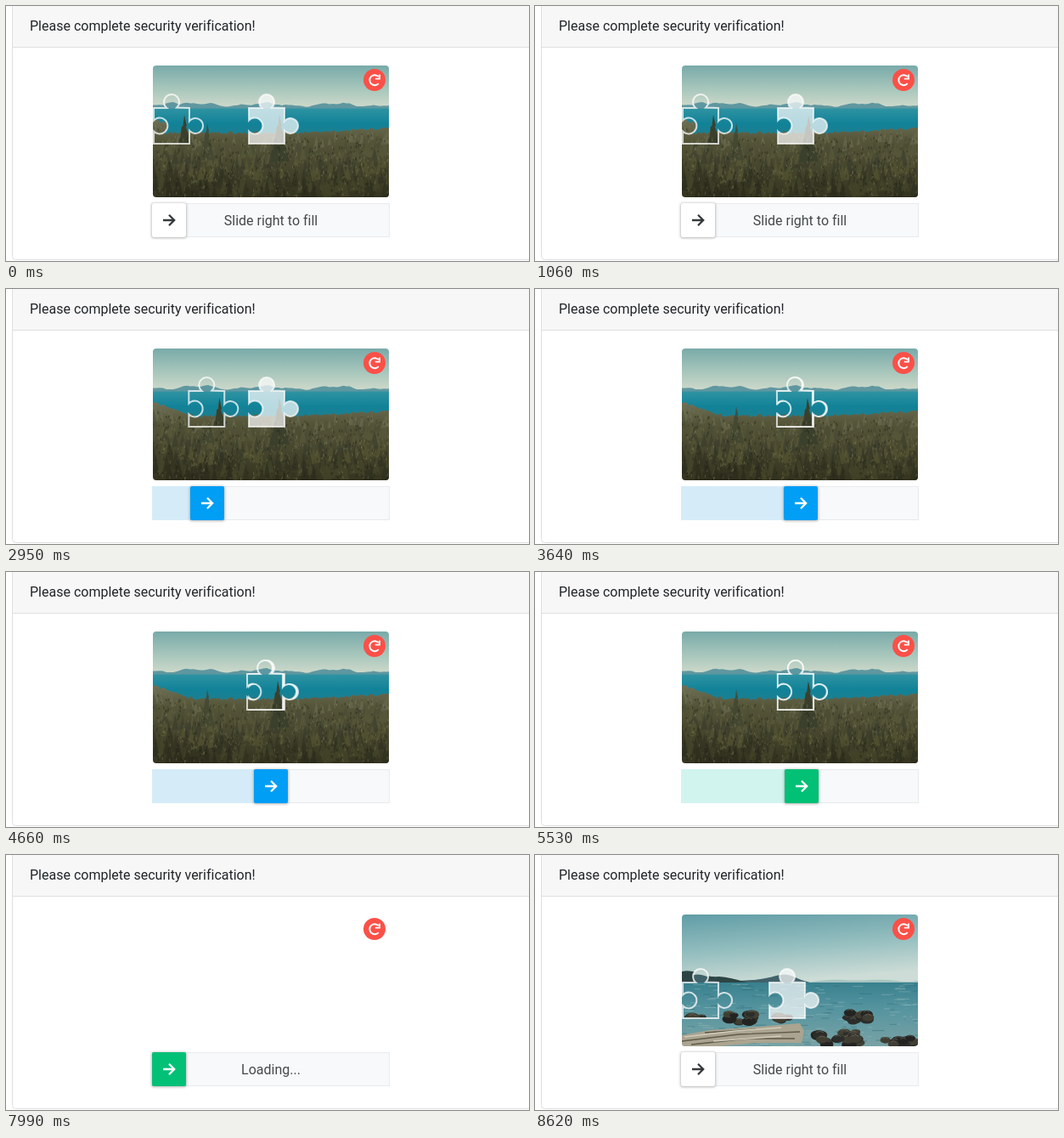
Write an HTML page that moves like this. It is 616 by 300 pixels and loops after 8.84 s.

```html
<!DOCTYPE html>
<html lang="en">
<head>
<meta charset="utf-8">
<title>Slider verification</title>
<style>
html, body { margin: 0; width: 100%; height: 100%; overflow: hidden; background: #fff; }
svg { display: block; }
.ui { font: 16px Roboto, sans-serif; font-variant-ligatures: none; }
.msg { font: 14px "Open Sans", sans-serif; fill: #fbfbfe; }
.host { font-weight: 600; }
</style>
</head>
<body>
<svg width="616" height="300" viewBox="0 0 616 300">
  <defs>
    <clipPath id="frame"><rect x="173" y="70" width="278" height="155" rx="4"/></clipPath>
    <clipPath id="cut"><path id="cutPath"/></clipPath>
    <linearGradient id="skyA" x1="0" y1="0" x2="0" y2="1">
      <stop offset="0" stop-color="#79aaa9"/><stop offset=".5" stop-color="#a3c4ba"/><stop offset="1" stop-color="#cfdacb"/>
    </linearGradient>
    <linearGradient id="lakeA" x1="0" y1="0" x2="0" y2="1">
      <stop offset="0" stop-color="#2f93a2"/><stop offset=".4" stop-color="#118298"/><stop offset="1" stop-color="#2b7a86"/>
    </linearGradient>
    <linearGradient id="woodA" x1="0" y1="0" x2="0" y2="1">
      <stop offset="0" stop-color="#6f7157"/><stop offset=".25" stop-color="#56563a"/><stop offset="1" stop-color="#34331f"/>
    </linearGradient>
    <linearGradient id="skyB" x1="0" y1="0" x2=".25" y2="1">
      <stop offset="0" stop-color="#609da6"/><stop offset=".55" stop-color="#96bfc0"/><stop offset="1" stop-color="#cddcd6"/>
    </linearGradient>
    <linearGradient id="seaB" x1="0" y1="0" x2="0" y2="1">
      <stop offset="0" stop-color="#39808e"/><stop offset=".4" stop-color="#55949f"/><stop offset="1" stop-color="#7aa3a5"/>
    </linearGradient>
    <filter id="soft" x="-20%" y="-20%" width="140%" height="150%"><feGaussianBlur stdDeviation="1.5"/></filter>
    <filter id="wide" x="-20%" y="-20%" width="140%" height="150%"><feGaussianBlur stdDeviation="6"/></filter>
  </defs>

  <rect width="616" height="300" fill="#fff"/>
  <rect x="7.5" y="-10" width="640" height="308.5" rx="4" fill="#fff" stroke="#dfdfdf"/>
  <path d="M8 0H616V48H8Z" fill="#f7f7f7"/>
  <path d="M8 48.5H616" stroke="#dfdfdf"/>
  <text class="ui" x="28" y="29" fill="#212529">Please complete security verification!</text>

  <g id="canvas">
    <g clip-path="url(#frame)">
      <g id="photo"><g id="forest"></g><g id="coast"></g></g>
    </g>
    <path id="hole" fill="#fff" fill-opacity=".7" stroke="#fff" stroke-opacity=".7" stroke-width="2"/>
    <g id="piece">
      <g clip-path="url(#cut)"><use id="copy" href="#photo"/></g>
      <path id="rim" fill="none" stroke="#fff" stroke-opacity=".75" stroke-width="2"/>
    </g>
  </g>
  <circle cx="434" cy="87" r="13" fill="#fb5048"/>
  <g fill="none" stroke="#fff" stroke-width="1.9">
    <path d="M438.8 91.2A6 6 0 1 1 438.8 83.2"/><path d="M440 80.5V85.6H434.8"/>
  </g>

  <rect x="172.5" y="232.5" width="279" height="39" fill="#f7f9fa" stroke="#e8ebee"/>
  <rect id="mask" x="172" y="232" height="40"/>
  <text id="label" class="ui" x="312" y="258" text-anchor="middle" fill="#45494c">Slide right to fill</text>
  <g id="knob">
    <rect x="171.5" y="232" width="41" height="41" rx="2" fill="#555" opacity=".45" filter="url(#soft)"/>
    <rect id="face" x="172" y="232" width="40" height="40" rx="2"/>
    <path id="arrow" d="M185 252H198M192 245.8L198.2 252L192 258.2" fill="none" stroke-width="2.3"/>
  </g>

  <g id="alert">
    <rect width="616" height="300" fill="#1c1b22" opacity=".45"/>
    <rect x="63" y="210" width="499" height="110" rx="5" fill="#111" opacity=".35" filter="url(#wide)"/>
    <rect x="63" y="209" width="499" height="110" rx="5" fill="#424148"/>
    <g fill="none" stroke="#fbfbfe" stroke-width="1.2">
      <circle cx="87.5" cy="233.5" r="7"/><ellipse cx="87.5" cy="233.5" rx="3.2" ry="7"/>
      <path d="M81.3 231H93.7M81.3 236H93.7"/>
    </g>
    <text class="msg host" x="98.5" y="239">cdpn.io</text>
    <text class="msg" x="79" y="276">Your captcha is successfully verified.</text>
    <rect id="ok" x="493" y="296" width="53" height="30" rx="4"/>
  </g>
</svg>
<script>
const LOOP = 8840;
const $ = id => document.getElementById(id);
const set = (id, attrs) => { for (const k in attrs) $(id).setAttribute(k, attrs[k]); };
const show = (id, on) => { $(id).style.display = on ? '' : 'none'; };

let seed = 11;
function rnd(a, b) {
  seed = (seed * 16807) % 2147483647;
  return a + (b - a) * seed / 2147483647;
}
const n = v => v.toFixed(1);
const path = (d, fill, more = '') => `<path d="${d}" fill="${fill}" ${more}/>`;

// Jagged line from left to right, closed down to a base line
function ridge(height, base, step, rough) {
  let d = `M173 ${base}`;
  for (let x = 173; x <= 452 + step; x += step) d += `L${x} ${n(height(x) + rnd(-rough, rough))}`;
  return d + `V${base}Z`;
}

function fir(x, top, h) {
  let d = `M${n(x)} ${n(top)}`;
  const w = h * 0.22, k = 4;
  for (let i = 1; i <= k; i++) d += `L${n(x + w * i / k)} ${n(top + h * i / k)}l${n(-w * 0.13)} -1`;
  for (let i = k; i >= 1; i--) d += `L${n(x - w * i / k)} ${n(top + h * i / k)}l${n(w * 0.13)} -1`;
  return d + 'Z';
}

const treeLine = x => 149 - 14 * Math.exp(-(((x - 173) / 30) ** 2)) - 5 * Math.exp(-(((x - 451) / 60) ** 2));

function drawForest() {
  let s = `<rect x="173" y="70" width="278" height="50" fill="url(#skyA)"/>`;
  s += path(ridge(x => 116 + 1.6 * Math.sin(x / 13) + Math.sin(x / 5), 122, 4, 0.6), '#5f97a0');
  s += `<rect x="173" y="120.5" width="278" height="45" fill="url(#lakeA)"/>`;
  s += path(ridge(treeLine, 226, 3, 2), 'url(#woodA)');
  const tones = ['#6e6f55', '#484c33', '#5b5c3c', '#38392a', '#5a5a36', '#2f2f20', '#48492c', '#27271a'];
  tones.forEach((tone, row) => {
    let d = '';
    for (let i = 0; i < 34; i++) {
      const x = rnd(172, 452);
      d += fir(x, treeLine(x) + 1 + row * 8 + rnd(-4, 7), rnd(10, 17) + row * 1.5);
    }
    s += path(d, tone, 'opacity=".55"');
  });
  s += path(fir(322, 128, 56), '#3b402c') + path(fir(237, 138, 44), '#434730', 'opacity=".8"');
  let light = '', dark = '';
  for (let i = 0; i < 600; i++) {
    const x = rnd(174, 450);
    const speck = `M${n(x)} ${n(rnd(treeLine(x) + 4, 222))}l${n(rnd(-1.5, 1.5))} ${n(rnd(1.5, 4))}`;
    if (i % 2) light += speck; else dark += speck;
  }
  s += path(light, 'none', 'stroke="#8a8862" stroke-opacity=".4"');
  $('forest').innerHTML = s + path(dark, 'none', 'stroke="#201f12" stroke-opacity=".4" stroke-width="1.5"');
}

// Heap of dark stones around a centre
function rocks(cx, cy, w, h, count) {
  let s = '';
  for (let i = 0; i < count; i++) {
    const x = cx + rnd(-w, w), y = cy + rnd(-h, h), r = rnd(5, 9);
    s += `<ellipse cx="${n(x)}" cy="${n(y)}" rx="${n(r)}" ry="${n(r * 0.62)}" fill="${['#2c2d2a', '#403e33', '#232422'][i % 3]}"/>`;
    s += path(`M${n(x - r * 0.5)} ${n(y - r * 0.35)}q${n(r * 0.5)} -3 ${n(r)} 0`, 'none', 'stroke="#757060" stroke-opacity=".6"');
  }
  return s;
}

function drawCoast() {
  let s = `<rect x="173" y="70" width="278" height="82" fill="url(#skyB)"/>`;
  s += path('M322 150Q345 146 362 147T395 147T425 148T451 148V152H322Z', '#a6c3c0');
  s += `<rect x="173" y="150" width="278" height="76" fill="url(#seaB)"/>`;
  s += path('M230 150Q245 147 258 147Q274 145 284 142Q294 139 302 142Q312 147 324 150Z', '#41626a');
  s += path('M173 150V137Q183 135 192 139Q205 144 217 143Q230 144 250 150Z', '#2c4544');
  let waves = '', glints = '';
  for (let i = 0; i < 190; i++) {
    const y = 152 + 73 * rnd(0, 1) ** 1.2;
    const w = `M${n(rnd(173, 448))} ${n(y)}h${n(rnd(4, 15))}`;
    if (i % 2) waves += w; else glints += w;
  }
  s += path(waves, 'none', 'stroke="#2f6b78" stroke-opacity=".5"');
  s += path(glints, 'none', 'stroke="#adc8c6" stroke-opacity=".35"');
  s += rocks(243, 192, 15, 5, 12) + rocks(381, 192, 14, 7, 14) + rocks(298, 193, 14, 3, 5);
  s += rocks(358, 216, 26, 8, 26) + rocks(430, 219, 20, 5, 12);
  s += path('M173 212L206 206L250 203L312 198L317 207L314 221L262 221L206 226H173Z', '#aaa490');
  s += path('M173 219L240 211L312 208M184 223L250 216L306 216M200 209L260 205', 'none', 'stroke="#5f5a49" stroke-width="1.3"');
  s += path('M176 214L236 207L290 203M210 219L290 213', 'none', 'stroke="#d2ccba" stroke-width="1.5"');
  $('coast').innerHTML = s;
}

// Jigsaw outline with a 42 px body, knobs at top and right, a notch at left
function jigsaw(x, y) {
  const at = (cx, cy, r, a) => `${n(cx + r * Math.cos(a * Math.PI))} ${n(cy + r * Math.sin(a * Math.PI))}`;
  const arc = (cx, cy, r, a, b, sweep) => `L${at(cx, cy, r, a)}A${r} ${r} 0 1 ${sweep} ${at(cx, cy, r, b)}`;
  const l = 42;
  return `M${x} ${y}` + arc(x + l / 2, y - 7, 9, 0.72, 2.26, 1) + `L${x + l} ${y}` +
    arc(x + l + 7, y + l / 2, 9, 1.21, 2.78, 1) + `L${x + l} ${y + l}L${x} ${y + l}` +
    arc(x + 7, y + l / 2, 9.4, 2.76, 1.24, 0) + 'Z';
}

// time, knob offset
const drag = [
  [2740, 2], [2950, 45], [3060, 53], [3280, 57], [3530, 60], [3640, 121], [3710, 124],
  [3860, 127], [4070, 126], [4250, 121], [4659, 121], [4660, 120], [4819, 120], [4880, 122]
];
const holds = [[3280, 3530], [3860, 4070]];

function offset(t) {
  if (t < 2740 || t >= 7990) return 0;
  for (const [a, b] of holds) if (t >= a && t < b) t = a;
  for (let i = 1; i < drag.length; i++) {
    const [t0, v0] = drag[i - 1], [t1, v1] = drag[i];
    if (t < t1) return Math.round(v0 + (v1 - v0) * (t - t0) / (t1 - t0));
  }
  return 122;
}

const WHITE = [255, 255, 255], BLUE = [0, 158, 245], GREEN = [2, 192, 118], INK = [55, 58, 60];
function mix(a, b, k) {
  k = Math.max(0, Math.min(1, k));
  return `rgb(${a.map((v, i) => Math.round(v + (b[i] - v) * k))})`;
}

function faceColors(t) {
  if (t < 5310) {
    const k = (t - 2360) / 230;
    return [mix(WHITE, BLUE, k), mix(INK, WHITE, k)];
  }
  if (t < 7990) return [mix(BLUE, GREEN, (t - 5310) / 220), '#fff'];
  const k = (t - 7990) / 240;
  return [mix(GREEN, WHITE, k), mix(WHITE, INK, k)];
}

let scene = '';
function useScene(name) {
  if (scene === name) return;
  scene = name;
  const coast = name === 'coast', x = coast ? 276 : 286, y = coast ? 150 : 120;
  show('forest', !coast);
  show('coast', coast);
  set('hole', { d: jigsaw(x, y) });
  set('cutPath', { d: jigsaw(174, y) });
  set('rim', { d: jigsaw(174, y) });
  set('copy', { x: 174 - x });
}

function render(t) {
  const x = offset(t), active = t >= 2740 && t < 7990, loading = t >= 7990 && t < 8620;
  useScene(t < 8620 ? 'forest' : 'coast');
  show('canvas', !loading);
  set('piece', { transform: `translate(${n(x * 220 / 240)} 0)` });
  set('knob', { transform: `translate(${x} 0)` });
  set('mask', { width: x, fill: t < 5310 ? '#d5ecf8' : '#d2f4ef' });
  show('label', !active);
  $('label').textContent = loading ? 'Loading...' : 'Slide right to fill';
  const [face, ink] = faceColors(t);
  set('face', { fill: face });
  set('arrow', { stroke: ink });
  show('alert', t >= 6410 && t < 7990);
  set('ok', { fill: t < 7380 ? '#00ddff' : t < 7790 ? '#80ebff' : '#aaf2ff' });
}

drawForest();
drawCoast();
const start = performance.now();
function tick() {
  render((performance.now() - start) % LOOP);
  requestAnimationFrame(tick);
}
render(0);
requestAnimationFrame(tick);
</script>
</body>
</html>
```
